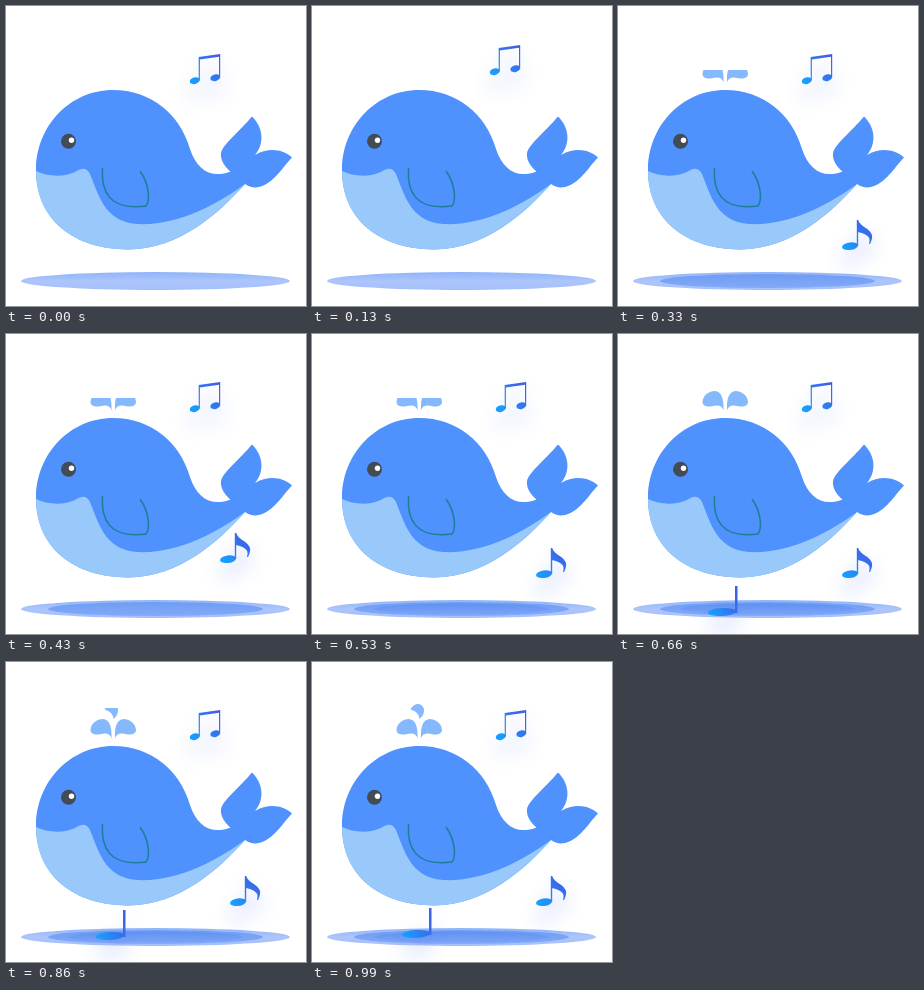
An HTML page with a canvas for the animation above (1.16 s loop, 300 px wide and 300 px high).

```html
<!DOCTYPE html>
<html lang="en">
<head>
<meta charset="utf-8">
<title>Singing whale</title>
<style>
html, body { margin: 0; width: 100%; height: 100%; overflow: hidden; background: #fff; }
canvas { display: block; width: 100vw; height: 100vh; }
</style>
</head>
<body>
<canvas id="stage" width="300" height="300"></canvas>
<script>
const ctx = document.getElementById('stage').getContext('2d');
const LOOP = 1160;
const BLUE = '#4f91fd', PALE = '#98c9fa', SPRAY = '#85b8fd';

const body = new Path2D(`M30 164 C30 120 64 84 107 84 C145 84 174 108 184 143
  C191 164 205 173 224.500 165.500 C219 161 214 154 215 147 C217 138 233 126 246 110.500
  C257 121 259 137 249 149 C262 141 277 143 286 151.500 C276 162 267 178 253 181
  C248 182 243 181 239 178 C213 207 174 243 122 243.500 C68 243 30 214 30 164 Z`);
const belly = new Path2D(`M30 165 C42 171 58 171 69 166 C76 162 80 161 84 168
  C92 187 98 216 131 218 C172 220 212 198 239 178 C213 207 174 243 122 243.500
  C68 243 30 214 30 165 Z`);
const fin = new Path2D('M96.500 162 C95 184 102 205 140 200 C145 193 142 176 134 165');
const leaf = 'M105.500 77 C105 72 100 70.500 95 72 C90 73.500 84.500 72 84.500 68 C85 61 91 57 97 57 C104 58 106 65 105.500 77 Z';
const spray = new Path2D(leaf);
spray.addPath(new Path2D(leaf), new DOMMatrix([-1, 0, 0, 1, 214.5, 0]));
spray.addPath(new Path2D('M107.500 57 C107 52 104 49 98.500 47.500 C101 43 104 42 106 42 C110 42 112.500 46 112 49 C112 52 110 55 107.500 57 Z'));

function note(heads, outline) {
  const p = new Path2D(outline);
  for (const [x, y, rx, ry, tilt] of heads) {
    const head = new Path2D();
    head.ellipse(x, y, rx, ry, tilt, 0, Math.PI * 2);
    p.addPath(head);
  }
  return p;
}

const pair = note([[188.7, 74.7, 5, 3.3, -.25], [209.3, 71.7, 5, 3.3, -.25]],
  'M192.700 51 L214.200 48 V71.500 H213 V50.800 L193.900 53.500 V74.500 H192.700 Z');
const flagged = note([[232, 240.2, 8, 3.8, -.12]],
  `M238.800 214 H240.200 C242 221 252 222 254 229 C254.500 232 253.500 235 252 238
   L251 238 C253 231 250 229 240.200 225 V240 H238.800 Z
   M240 220 C244 224 251 224 253 231 L252 233 C248 227 243 227 240 226 Z`);
const single = note([[104, 272, 14.3, 3.9, -.06]], 'M117 246 H119.500 V273 H117 Z');

function fill(path, color) {
  ctx.fillStyle = color;
  ctx.fill(path);
}

function oval(x, y, rx, ry, color) {
  ctx.beginPath();
  ctx.ellipse(x, y, rx, ry, 0, 0, Math.PI * 2);
  ctx.fillStyle = color;
  ctx.fill();
}

function blend(x0, y0, x1, y1, ...colors) {
  const g = ctx.createLinearGradient(x0, y0, x1, y1);
  colors.forEach((c, i) => g.addColorStop(i / (colors.length - 1), c));
  return g;
}

function drawNote(path, x0, y0, x1, y1, dx = 0, dy = 0) {
  ctx.save();
  ctx.translate(dx, dy);
  ctx.shadowColor = 'rgba(70,110,250,.38)';
  ctx.shadowBlur = 20;
  ctx.shadowOffsetY = 13;
  fill(path, blend(x0, y0, x1, y1, '#14a5ff', '#2f7cf0', '#3f5de6'));
  ctx.restore();
}

function drawPool(t) {
  oval(149.5, 275, 134.5, 9, blend(0, 266, 0, 284, '#8fb4fa', '#adc5fc', '#a5bffb'));
  if (t >= 330) oval(149.5, 275, 107.5, 7, blend(0, 268, 0, 282, '#6f9df3', '#84a9f7'));
  if (t >= 530) oval(149.5, 275, 87.5, 5.5, blend(0, 269, 0, 281, '#5f90f0', '#7da5f7'));
}

function drawWhale() {
  fill(body, BLUE);
  fill(belly, PALE);
  fill(fin, BLUE);
  ctx.strokeStyle = '#1c7f94';
  ctx.lineWidth = 1.5;
  ctx.lineJoin = 'round';
  ctx.stroke(fin);
  oval(62.5, 135.3, 7.5, 7.5, '#434b54');
  oval(65.5, 134.3, 2.7, 2.7, '#fff');
}

// The spray is uncovered upwards in steps.
function drawSpray(t) {
  if (t < 330) return;
  const top = t < 660 ? 64 : t < 760 ? 57 : t < 860 ? 51 : t < 990 ? 46 : 41;
  ctx.save();
  ctx.beginPath();
  ctx.rect(80, top, 55, 80 - top);
  ctx.clip();
  fill(spray, SPRAY);
  ctx.restore();
}

function drawNotes(t) {
  const hop = t >= 130 && t < 200;
  drawNote(pair, 184, 78, 214, 50, hop ? -6 : 0, hop ? -9 : 0);
  if (t >= 330) {
    const lift = t >= 430 && t < 530;
    drawNote(flagged, 224, 243, 252, 216, lift ? -10 : 0, lift ? -15 : 0);
  }
  if (t >= 660) {
    const dy = t < 760 ? 6 : t < 860 ? 4 : t < 990 ? 2 : 0;
    drawNote(single, 90, 275, 122, 256, 0, dy);
  }
}

function frame(now) {
  const t = now % LOOP;
  ctx.fillStyle = '#fff';
  ctx.fillRect(0, 0, 300, 300);
  drawPool(t);
  drawWhale();
  drawSpray(t);
  drawNotes(t);
}

let start;
function tick(now) {
  start ??= now;
  frame(now - start);
  requestAnimationFrame(tick);
}
frame(0);
requestAnimationFrame(tick);
</script>
</body>
</html>
```
